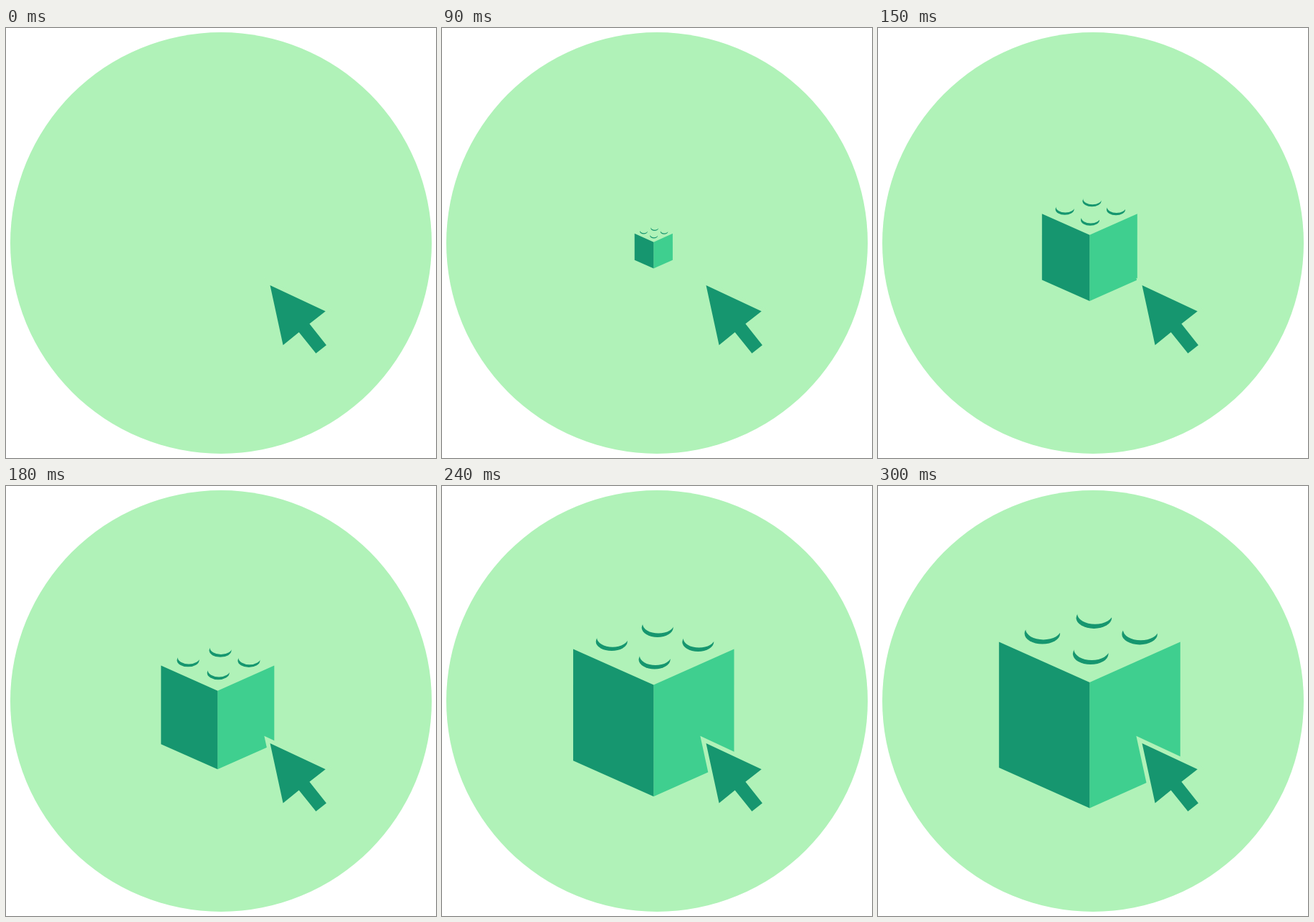
An HTML page with a canvas that plays this animation: 600 by 600 pixels, repeating every 3000 ms.

```html
<!DOCTYPE html>
<html lang="en">
<head>
<meta charset="utf-8">
<title>Brick pop</title>
<style>
  html, body { margin: 0; width: 100%; height: 100%; overflow: hidden; background: #fff; }
  canvas { display: block; width: 600px; height: 600px; }
</style>
</head>
<body>
<canvas id="stage" width="600" height="600"></canvas>
<script>
const ctx = document.getElementById('stage').getContext('2d');
const MINT = '#b0f2b8', DARK = '#16966f', LIGHT = '#3fcf8f';
const LOOP = 3000, STEP = 30, FULL = 133;

// Growth keys: [ms, scale], linear in between, with a small overshoot.
const GROWTH = [[0, 0], [90, 0.2], [150, 0.5], [210, 0.688], [270, 1], [300, 0.951]];

// Stud centre x and lower edge y, in half widths from the brick centre.
const STUDS = [[-0.522, -0.67], [0.0475, -0.841], [0.552, -0.663], [0.011, -0.4445]];

// One side of the arrow, along and across its axis, from the tip.
const HALF_ARROW = [[76.5, 37.9], [76.3, 9.4], [114.2, 9.3]];
const ARROW = [[0, 0], ...HALF_ARROW, ...HALF_ARROW.map(([x, y]) => [x, -y]).reverse()];

function scaleAt(ms) {
  const t = Math.floor(ms / STEP) * STEP;
  const i = GROWTH.findIndex(([time]) => time > t);
  if (i < 0) return GROWTH[GROWTH.length - 1][1];
  const [t0, a] = GROWTH[i - 1], [t1, b] = GROWTH[i];
  return a + (b - a) * (t - t0) / (t1 - t0);
}

function polygon(points, color) {
  ctx.beginPath();
  points.forEach(([x, y]) => ctx.lineTo(x, y));
  ctx.closePath();
  ctx.fillStyle = color;
  ctx.fill();
}

function ellipse(x, y, rx, ry, color) {
  ctx.beginPath();
  ctx.ellipse(x, y, rx, ry, 0, 0, Math.PI * 2);
  ctx.fillStyle = color;
  ctx.fill();
}

// Only the shaded rim below each stud's top stays visible.
function stud(x, bottom, w) {
  const rx = 0.196 * w, ry = 0.117 * w, y = bottom - ry;
  ctx.save();
  ctx.beginPath();
  ctx.rect(0, 0, 600, 600);
  ctx.ellipse(x + 0.012 * w, y - 0.048 * w, rx, ry, 0, 0, Math.PI * 2);
  ctx.clip('evenodd');
  ellipse(x, y, rx, ry, DARK);
  ctx.restore();
}

function brick(w) {
  const at = (x, y) => [295.3 + x * w, 305.3 + y * w];
  const face = (side, color) =>
    polygon([at(side, -0.694), at(0, -0.248), at(0, 1.14), at(side, 0.694)], color);
  face(1, LIGHT);
  face(-1, DARK);
  STUDS.forEach(([x, y]) => stud(...at(x, y), w));
}

function cursor() {
  ctx.save();
  ctx.translate(368.5, 359);
  ctx.rotate(51.4 * Math.PI / 180);
  polygon(ARROW, DARK);
  ctx.lineWidth = 11.6;
  ctx.strokeStyle = MINT;
  ctx.stroke();
  polygon(ARROW, DARK);
  ctx.restore();
}

function draw(ms) {
  const w = FULL * scaleAt(ms);
  ctx.fillStyle = '#fff';
  ctx.fillRect(0, 0, 600, 600);
  ellipse(300, 300, 294, 294, MINT);
  if (w > 0) brick(w);
  cursor();
}

const start = performance.now();
function tick() {
  draw((performance.now() - start) % LOOP);
  requestAnimationFrame(tick);
}
tick();
</script>
</body>
</html>
```
